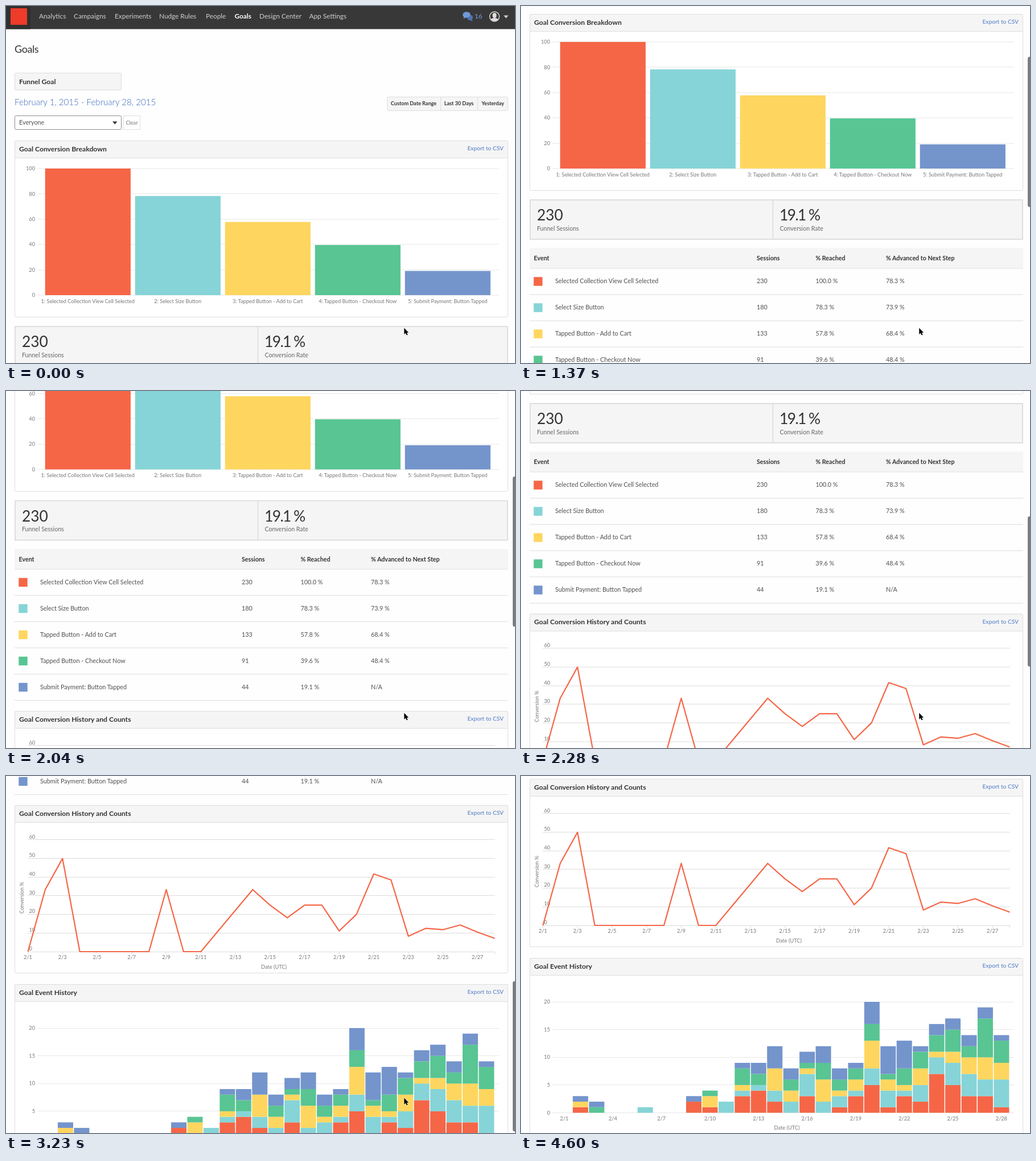
Animation, 894 px wide and 626 px high, one loop 5500 ms. Source, as an HTML page:

```html
<!DOCTYPE html>
<html lang="en">
<head>
<meta charset="utf-8">
<title>Goals</title>
<style>
  html, body { margin: 0; width: 100%; height: 100%; overflow: hidden; background: #fefefe; }
  svg { display: block; width: 100%; height: 100%; }
  text { font-family: Lato, "Open Sans", sans-serif; fill: #505050; white-space: pre; }
  .nav { font-size: 11.8px; fill: #d0d0d0; }
  .on { font-weight: 700; fill: #fff; }
  .h1 { font-size: 18px; letter-spacing: -.4px; fill: #333; }
  .range { font-size: 15.1px; font-weight: 300; fill: #3665bb; }
  .title { font-size: 12.2px; font-weight: 700; fill: #333; }
  .link { font-size: 10.2px; fill: #4c78c4; }
  .btn { font-size: 9.1px; font-weight: 700; fill: #333; }
  .cell { font-size: 10.8px; }
  .th { font-size: 10.7px; font-weight: 700; fill: #333; }
  .big { font-size: 26.4px; fill: #333; }
  .tight { letter-spacing: -1.6px; }
  .note { font-size: 10.6px; fill: #666; }
  .axis { font-size: 9.2px; fill: #777; }
</style>
</head>
<body>
<svg id="stage" viewBox="0 0 894 626"></svg>
<script>
const NS = 'http://www.w3.org/2000/svg';
const stage = document.getElementById('stage');
const RED = '#f56647', TEAL = '#86d4d7', YELLOW = '#fed65f', GREEN = '#58c593', BLUE = '#7494cc';
const COLORS = [RED, TEAL, YELLOW, GREEN, BLUE];
const PALE = '#f5f5f5', EDGE = '#dedede';

function add(parent, tag, attrs, content) {
  const el = document.createElementNS(NS, tag);
  for (const k in attrs) el.setAttribute(k, attrs[k]);
  if (content !== undefined) el.textContent = content;
  parent.appendChild(el);
  return el;
}

const page = add(stage, 'g', {});

const rect = (x, y, width, height, fill, more) =>
  add(page, 'rect', { x, y, width, height, fill, ...more });
const box = (x, y, w, h, fill, stroke = EDGE, rx = 2) =>
  rect(x + .5, y + .5, w - 1, h - 1, fill, { stroke, rx });
const path = (d, more) => add(page, 'path', { d, ...more });
const hline = (x1, x2, y, color) => rect(x1, y, x2 - x1, 1, color);
const text = (x, y, str, cls, anchor = 'start') =>
  add(page, 'text', { x, y, class: cls, 'text-anchor': anchor }, str);

function panel(y, h, title) {
  box(15, y, 867, h, '#fff');
  box(15, y, 867, 31, PALE);
  text(23, y + 18.5, title, 'title');
  text(874, y + 17, 'Export to CSV', 'link', 'end');
}

function drawHeader() {
  rect(0, 0, 894, 40.5, '#383838');
  rect(0, 0, 43, 40.5, '#303030');
  rect(8, 4, 29, 29, '#ee3b2a');
  const items = [[58, 'Analytics'], [119, 'Campaigns'], [191, 'Experiments'], [269, 'Nudge Rules'],
    [351, 'People'], [401.5, 'Goals'], [445, 'Design Center'], [532.5, 'App Settings']];
  for (const [x, label] of items) text(x, 22, label, label === 'Goals' ? 'nav on' : 'nav');

  // chat bubbles
  path('M810 21a5 4.500 0 1 1 8 2.500l2 3.500-5-2q-4 0-5-4z', { fill: '#4f74b3' });
  path('M809 10c4 0 7 2.300 7 5.500s-3 5.500-7 5.500l-2-.2-4 2.200 1-3.500c-1.300-1-2-2.400-2-4 0-3.200 3-5.500 7-5.500z',
    { fill: '#7199d8', stroke: '#383838', 'stroke-width': .6 });
  text(823, 22, '16', 'nav').style.fill = '#7199d8';

  // account icon
  add(page, 'circle', { cx: 858, cy: 18.5, r: 8.5, fill: 'none', stroke: '#ddd', 'stroke-width': 1.5 });
  add(page, 'ellipse', { cx: 858, cy: 16.5, rx: 3.6, ry: 4.5, fill: '#ddd' });
  path('M851.500 24q1-2.500 4.500-3h4q3.500.5 4.500 3-6.500 5-13 0z', { fill: '#ddd' });
  path('M874 16.500h8.500l-4.250 5z', { fill: '#ccc' });
}

function drawFilters() {
  text(15, 82, 'Goals', 'h1');
  box(15, 117, 188, 31, PALE);
  text(23, 136.5, 'Funnel Goal', 'title');
  text(15, 173.5, 'February 1, 2015 - February 28, 2015', 'range');

  box(669, 159, 213, 25, PALE);
  for (const x of [763, 828]) rect(x, 159, 1, 25, EDGE);
  text(716, 174, 'Custom Date Range', 'btn', 'middle');
  text(795.5, 174, 'Last 30 Days', 'btn', 'middle');
  text(855, 174, 'Yesterday', 'btn', 'middle');

  box(15, 192, 188, 25, '#fff', '#8c8c8c');
  text(23, 208, 'Everyone', 'cell');
  path('M187 202.500h8.500l-4.250 5z', { fill: '#333' });
  box(206, 192, 30, 25, '#fff', EDGE, 0);
  text(221, 207.5, 'Clear', 'axis', 'middle');
}

const EVENTS = [
  ['Selected Collection View Cell Selected', 230, '100.0 %', '78.3 %'],
  ['Select Size Button', 180, '78.3 %', '73.9 %'],
  ['Tapped Button - Add to Cart', 133, '57.8 %', '68.4 %'],
  ['Tapped Button - Checkout Now', 91, '39.6 %', '48.4 %'],
  ['Submit Payment: Button Tapped', 44, '19.1 %', 'N/A']
];

function drawFunnel() {
  panel(236, 310, 'Goal Conversion Breakdown');
  for (let v = 0; v <= 100; v += 20) {
    const y = 507 - v * 2.22;
    hline(55, 866, Math.round(y) - .5, '#e8e8e8');
    text(51, y + 3.2, v, 'axis', 'end');
  }
  EVENTS.forEach(([name, , reached], i) => {
    const h = parseFloat(reached) * 2.22, x = 68.7 + i * 158;
    rect(x, 507 - h, 150.2, h, COLORS[i]);
    text(x + 75, 520.5, `${i + 1}: ${name}`, 'axis', 'middle');
  });
}

function drawTable() {
  rect(16, 562, 865, 69, PALE, { stroke: '#d9d9d9', 'stroke-width': 1.6 });
  rect(441.7, 562, 1.4, 69, '#d9d9d9');
  text(28, 598, '230', 'big');
  text(28, 615.5, 'Funnel Sessions', 'note');
  text(454, 598, '19.1 %', 'big tight');
  text(454.5, 615.5, 'Conversion Rate', 'note');

  const cols = [60, 414, 517.5, 641];
  rect(15, 646.5, 867, 35.5, PALE);
  ['Event', 'Sessions', '% Reached', '% Advanced to Next Step'].forEach((label, i) =>
    text(i ? cols[i] : 22.5, 668, label, 'th'));
  hline(15, 882, 681.5, '#e2e2e2');
  EVENTS.forEach((row, i) => {
    const y = 682 + i * 46;
    rect(22.3, y + 15.3, 15.4, 15.4, COLORS[i]);
    row.forEach((v, k) => text(cols[k], y + 26, v, 'cell'));
    hline(15, 882, y + 45.5, '#dedede');
  });
}

function drawHistory() {
  const rates = [0, 33.3, 50, 0, 0, 0, 0, 0, 33.3, 0, 0, 11.1, 22.2, 33.3, 25, 18.2, 25, 25,
    11.1, 20, 41.7, 38.5, 8.3, 12.5, 11.8, 14.3, 10.5, 7.1];
  const base = 1187.5, unit = 3.267, px = i => 38.5 + i * 30.37;
  panel(930.5, 295, 'Goal Conversion History and Counts');
  for (let v = 0; v <= 60; v += 10) {
    const y = base - v * unit;
    hline(38, 859, Math.round(y) - .5, '#dcdcdc');
    text(40.5, y - 2.2, v, 'axis');
  }
  rates.forEach((_, i) => {
    if (i % 2 && i < 27) return;
    rect(px(i) - .5, base, 1, 5, '#dcdcdc');
    if (i < 27) text(px(i), base + 13.3, `2/${i + 1}`, 'axis', 'middle');
  });
  text(470.5, base + 30.2, 'Date (UTC)', 'axis', 'middle');
  add(page, 'text', { class: 'axis', 'text-anchor': 'middle',
    transform: `translate(31 ${base - 94.5}) rotate(-90)` }, 'Conversion %');
  path('M' + rates.map((v, i) => `${px(i)} ${base - v * unit}`).join('L'),
    { fill: 'none', stroke: RED, 'stroke-width': 2.2, 'stroke-linejoin': 'round' });
}

function drawEvents() {
  // day: count per event, bottom to top
  const days = {
    2: '10101', 3: '00011', 6: '01000', 9: '20001', 10: '10210', 11: '02000', 12: '31131',
    13: '41022', 14: '22404', 15: '02222', 16: '34112', 17: '02433', 18: '12122', 19: '31221',
    20: '53534', 21: '13215', 22: '31135', 23: '23331', 24: '73132', 25: '54242', 26: '34322',
    27: '33472', 28: '15341'
  };
  const base = 1516, unit = 9.725, px = d => 76 + (d - 1) * 28.44;
  panel(1244.5, 420, 'Goal Event History');
  for (let v = 0; v <= 20; v += 5) {
    const y = base - v * unit;
    hline(55, 866, Math.round(y) - .5, '#e8e8e8');
    text(51, y + 3.2, v, 'axis', 'end');
  }
  for (const d in days) {
    let y = base;
    [...days[d]].forEach((n, k) => {
      const h = n * unit;
      y -= h;
      if (h) rect(px(d) - 13.5, y, 27, h, COLORS[k]);
    });
  }
  for (let d = 1; d <= 28; d += 3) text(px(d), base + 13.5, `2/${d}`, 'axis', 'middle');
  text(467, base + 29, 'Date (UTC)', 'axis', 'middle');
}

drawHeader();
drawFilters();
drawFunnel();
drawTable();
drawHistory();
drawEvents();

const thumb = add(stage, 'rect', { x: 890, width: 8, height: 263.5, rx: 3.5, fill: '#7c7c7c' });
const cursor = add(stage, 'path', { d: 'M0 0V11.200L2.600 8.900L4.400 12.800L6.300 12L4.600 8.200H7.900Z',
  fill: '#000', stroke: '#fff', 'stroke-width': 1, 'paint-order': 'stroke' });

const LOOP = 5500;
const SCROLL = [[0, 0], [590, 15], [890, 79], [1130, 150], [1370, 222], [1600, 290], [1840, 340],
  [2040, 369.5], [2280, 540], [2510, 690], [2750, 794.5], [2990, 855], [3230, 879.5],
  [3470, 897], [3680, 909], [3890, 925.5]];
const BAR = [[0, 0], [590, 1], [4450, .45], [4600, 0]];
const POINTER = [[0, [699.3, 564.5]], [4100, [760.3, 595.5]], [4310, null]];

// value of the last step that has begun
const at = (steps, t) => steps.filter(s => s[0] <= t).pop()[1];

function render(t) {
  const y = at(SCROLL, t), p = at(POINTER, t);
  page.setAttribute('transform', `translate(0 ${-y})`);
  thumb.setAttribute('y', y * .4118 - 2.5);
  thumb.setAttribute('opacity', at(BAR, t));
  cursor.setAttribute('visibility', p ? 'visible' : 'hidden');
  if (p) cursor.setAttribute('transform', `translate(${p})`);
}

const start = performance.now();
function tick() {
  render((performance.now() - start) % LOOP);
  requestAnimationFrame(tick);
}
tick();
</script>
</body>
</html>
```
